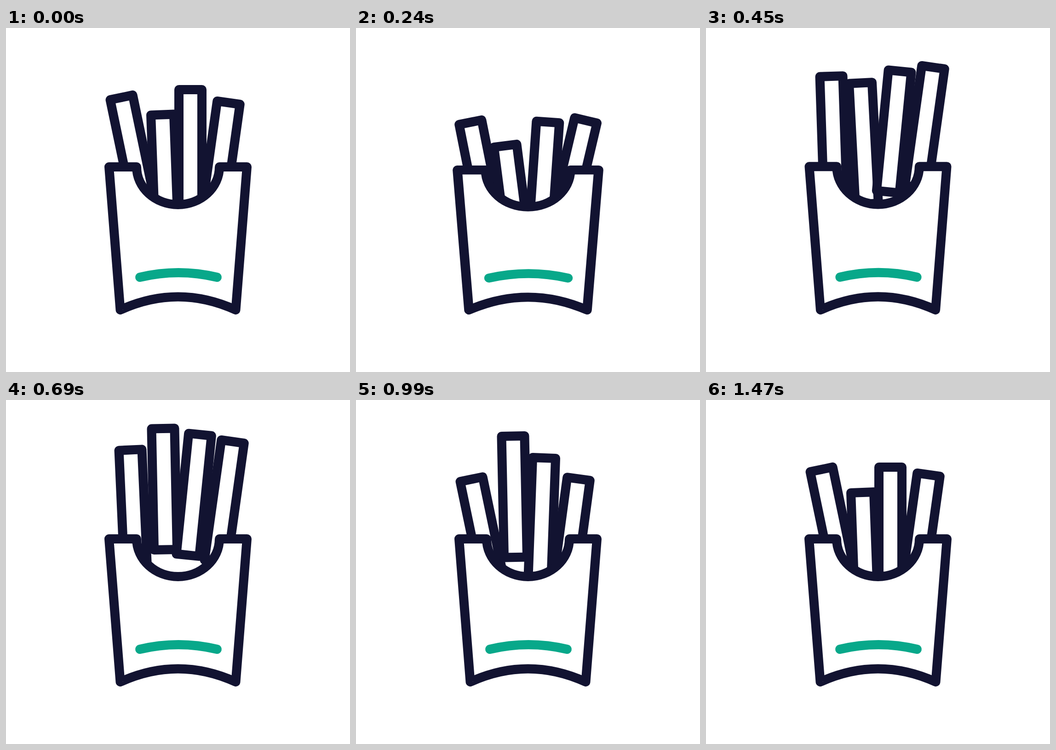
These frames come from a looping animation (748x748 px, 1.86 s). An HTML page:

```html
<!DOCTYPE html>
<html lang="en">
<head>
<meta charset="utf-8">
<title>Fries</title>
<style>
  html, body { margin: 0; width: 100%; height: 100%; overflow: hidden; background: #fff; }
  svg { display: block; width: 100%; height: 100%; }
  .ink { fill: #fff; stroke: #121331; stroke-width: 20; stroke-linecap: round; stroke-linejoin: round; }
  .smile { fill: none; stroke: #08a88a; stroke-width: 20; stroke-linecap: round; }
</style>
</head>
<body>
<svg viewBox="0 0 748 748">
  <g id="fries"></g>
  <g id="box">
    <path class="ink" d="M224 302H284C284 347 324.5 384 374 384S464 347 464 302H524L499.5 613Q374 556 248.5 613Z"/>
    <path class="smile" d="M291 542Q375 522 459 542"/>
  </g>
</svg>
<script>
const LOOP = 1860, STEP = 30, PIVOT = 623;

// All fries share the jump times and the lean times; each falls on its own schedule.
const jumpTimes = [0, 160, 240, 450];
const leanTimes = [0, 200, 450, 690, 990, 1200];
const squash = { t: [0, 135, 240, 360, 540], v: [0, 0.1, 0.024, -0.006, 0] };

const fries = [
  makeFry([151, 238, 205, 105], [540, 690, 960, 1140], [99, 108.5, 174, 151],
    [251, 247, 272.5, 270.5, 251, 251], [-11.8, -12, -1.9, -2.6, -11.8, -11.8]),
  makeFry([188.5, 278, 256, 119.5], [720, 990, 1080, 1230, 1275, 1470], [61, 78.5, 110, 200.5, 212, 201],
    [340, 324, 336, 341.5, 341.5, 340], [-2.1, -7.6, -3, -1.2, -1.2, -2.1]),
  makeFry([134, 226, 204.5, 94], [660, 990, 1100, 1310], [74.5, 126, 160, 146],
    [401, 416, 421.5, 422, 409, 401], [0, 3.5, 5.6, 5.8, 2.1, 0]),
  makeFry([162.5, 240, 201, 85.5], [510, 690, 910, 1120], [80, 90.5, 176, 162.5],
    [484, 500, 494, 493, 484, 484], [8, 13.7, 8, 8, 7.7, 8])
];

function makeFry(jump, fallTimes, fall, x, angle) {
  const el = document.createElementNS("http://www.w3.org/2000/svg", "rect");
  const attrs = { class: "ink", x: -25, y: 0, width: 50, height: 263.5 };
  for (const name in attrs) el.setAttribute(name, attrs[name]);
  document.getElementById("fries").appendChild(el);
  return {
    el,
    x: { t: leanTimes, v: x },
    y: { t: jumpTimes.concat(fallTimes), v: jump.concat(fall) },
    angle: { t: leanTimes, v: angle }
  };
}

// Smooth interpolation that never overshoots its keys.
function slope({ t, v }, i) {
  if (i === 0 || i === t.length - 1) return 0;
  const rate = j => (v[j + 1] - v[j]) / (t[j + 1] - t[j]);
  const a = rate(i - 1), b = rate(i);
  return a * b <= 0 ? 0 : 2 * a * b / (a + b);
}

function sample(track, time) {
  const { t, v } = track, last = t.length - 1;
  if (time >= t[last]) return v[last];
  let i = 0;
  while (time >= t[i + 1]) i++;
  const span = t[i + 1] - t[i], u = (time - t[i]) / span, w = 1 - u;
  return v[i] * w * w * (1 + 2 * u) + v[i + 1] * u * u * (1 + 2 * w)
    + span * u * w * (slope(track, i) * w - slope(track, i + 1) * u);
}

const box = document.getElementById("box");

function draw(time) {
  for (const f of fries) {
    f.el.setAttribute("transform",
      `translate(${sample(f.x, time)} ${sample(f.y, time)}) rotate(${sample(f.angle, time)})`);
  }
  const s = sample(squash, time);
  box.setAttribute("transform",
    `translate(374 ${PIVOT}) scale(${1 + s} ${1 - 0.88 * s}) translate(-374 ${-PIVOT})`);
}

const start = performance.now();
function tick() {
  const time = (performance.now() - start) % LOOP;
  draw(Math.floor(time / STEP) * STEP);
  requestAnimationFrame(tick);
}
draw(0);
requestAnimationFrame(tick);
</script>
</body>
</html>
```
